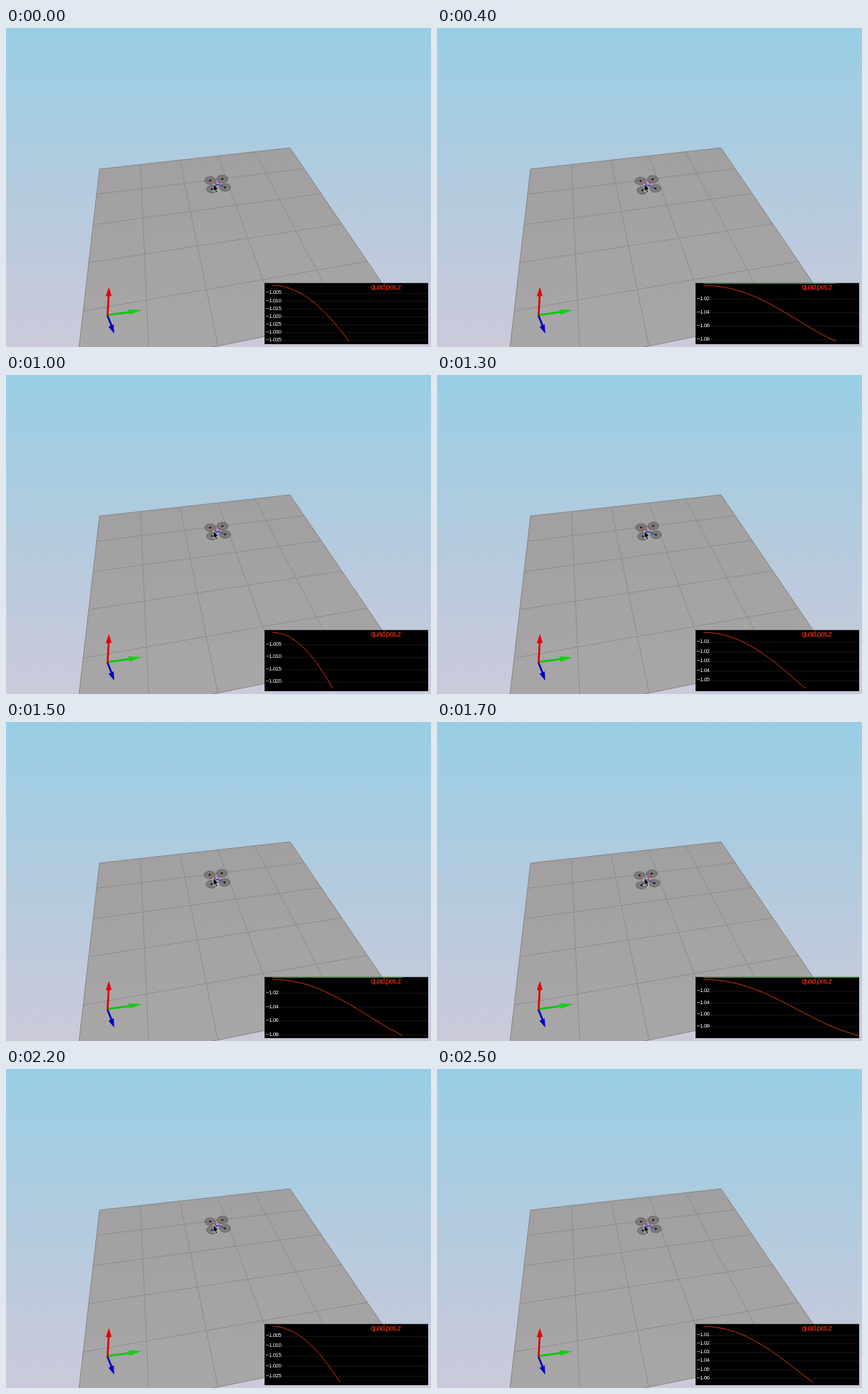
An HTML page that plays this animation: 600 px wide and 450 px high, repeating every 2600 ms.

```html
<!DOCTYPE html>
<html lang="en">
<head>
<meta charset="utf-8">
<title>Quadcopter height plot</title>
<style>
  html, body { margin: 0; width: 100%; height: 100%; overflow: hidden; background: #cbcbdb; }
  svg { display: block; width: 600px; height: 450px; }
  text { font-family: "Liberation Sans", Arial, sans-serif; }
  .title { font-size: 10px; letter-spacing: -.7px; fill: #ff3510; }
  .tick { font-size: 8px; letter-spacing: -.5px; fill: #f0f0f0; }
</style>
</head>
<body>
<svg viewBox="0 0 600 450">
  <defs>
    <linearGradient id="sky" x1="0" y1="0" x2="0" y2="1">
      <stop offset="0" stop-color="#98cee5"/>
      <stop offset=".5" stop-color="#b3cbde"/>
      <stop offset="1" stop-color="#cbcada"/>
    </linearGradient>
    <linearGradient id="ground" x1="0" y1="0" x2="0" y2="1">
      <stop offset="0" stop-color="#a19f9f"/>
      <stop offset="1" stop-color="#a9a7a8"/>
    </linearGradient>
    <clipPath id="panel"><rect x="365" y="359.5" width="231" height="86.5"/></clipPath>
  </defs>
  <rect width="600" height="450" fill="url(#sky)"/>
  <path id="floor" fill="url(#ground)" stroke="#858384"/>
  <path id="grid" fill="none" stroke="#8d8b8c"/>

  <g stroke-width="2.6">
    <path d="M143 405L149 420" stroke="#0000b8"/>
    <path d="M144.8 421.5L152 418L152.8 431Z" fill="#0000c8"/>
    <path d="M143 405L175 400.6" stroke="#00c800"/>
    <path d="M172.8 397L191.5 398L174.4 404.5Z" fill="#10d010"/>
    <path d="M143.4 406L145 377" stroke="#d80000"/>
    <path d="M141 378L145.2 365.5L149 377.5Q145 379.5 141 378Z" fill="#e40000"/>
  </g>

  <g id="drone"></g>
  <path d="M292.6 219.8V230.6L295 228.5L296.9 232.8L298.8 232L296.9 227.8H300.2Z"
        fill="#000" stroke="#fff" stroke-width=".7"/>

  <g clip-path="url(#panel)">
    <rect x="365" y="359.5" width="231" height="86.5" fill="#000"/>
    <g id="ticks"></g>
    <path id="goal" fill="none" stroke="#3fa536" stroke-width="1.3"/>
    <path id="curve" fill="none" stroke="#d8350f"/>
    <text class="title" x="515" y="369">quad.pos.z</text>
  </g>
</svg>
<script>
const LOOP = 2600, STEP = 100;
const LAUNCHES = [-548, 570, 1717];   // start of each flight, ms
const LEFT = 376.3, TOP = 363.2, BOTTOM = 442, SPEED = 19.72;
const $ = id => document.getElementById(id);
const put = (id, d) => $(id).setAttribute("d", d);

// Ground plane: unit square in perspective
function ground(u, v) {
  const w = 1 + .0951 * u - .4442 * v;
  return ((132 + 307.1 * u - 77.2 * v) / w).toFixed(2) + " " +
         ((199 - 13.9 * u + 73 * v) / w).toFixed(2);
}
const segment = (a, b, c, d) => `M${ground(a, b)}L${ground(c, d)}`;

put("floor", `M${ground(0, 0)}L${ground(1, 0)}L${ground(1, 1)}L${ground(0, 1)}Z`);
let lines = "";
for (let i = 1; i < 5; i++) lines += segment(i / 5, 0, i / 5, 1) + segment(0, i / 5, 1, i / 5);
put("grid", lines);

// Distance travelled along z after p tenths of a second
const drop = p => .001245 * p * p / (1 + Math.pow(p / 12.7, 3.5));

function tickStep(scale) {
  for (let e = -5; e < 0; e++)
    for (const m of [1, 2, 5]) {
      const step = m * Math.pow(10, e);
      if (step * scale > 10.5) return [step, -e];
    }
  return [.1, 1];
}

function drawPlot(p) {
  const depth = drop(p), range = Math.max(depth, .001);
  const scale = (BOTTOM - TOP) / range;
  const yOf = z => (TOP + BOTTOM) / 2 + (z - depth / 2) * scale;
  const [step, digits] = tickStep(scale);

  let ticks = "";
  for (let k = 0; yOf(k * step) < 444; k++) {
    const y = yOf(k * step);
    if (y < 368) continue;
    ticks += `<path d="M366 ${y.toFixed(2)}H596" stroke="#191919"/>` +
      `<text class="tick" x="366.8" y="${(y + 1.2).toFixed(2)}">\u2212${(1 + k * step).toFixed(digits)}</text>`;
  }
  $("ticks").innerHTML = ticks;

  const points = [];
  for (let i = 0; i <= 60; i++) {
    const q = p * i / 60;
    points.push((LEFT + q * SPEED).toFixed(2) + " " + yOf(drop(q)).toFixed(2));
  }
  put("curve", "M" + points.join("L"));
  put("goal", .003 * scale < 3.3 ? `M${LEFT} 360.2H${(LEFT + p * SPEED).toFixed(2)}` : "");
}

function drawDrone(p) {
  const lift = 1.7 * Math.sin(Math.PI * p / 11);
  const tilt = Math.pow(p / 9.4, 2);
  const dx = -Math.pow(p / 9.6, 6);
  const at = (x, y, t) => [x + dx, y - lift + tilt * t];
  const rotors = [at(288.3, 217, -.5), at(305.5, 214.8, -.6), at(291, 228.5, 1.2), at(309.3, 226.4, .6)];
  const [cx, cy] = at(298.3, 222, .2);
  const arms = ["#d8502e", "#d8402e", "#333a70", "#4146a0"];

  const discs = rotors.map(([x, y]) =>
    `<ellipse cx="${x}" cy="${y}" rx="7.8" ry="5.4" fill="#555" fill-opacity=".5" stroke="#555" stroke-width=".7"/>`);
  const beams = rotors.map(([x, y], i) =>
    `<path d="M${cx} ${cy}L${x} ${y}" stroke="${arms[i]}" stroke-width="1.2"/>` +
    `<circle cx="${x}" cy="${y}" r="1.4" fill="#151520"/>`);
  $("drone").innerHTML = discs.join("") + beams.join("") +
    `<ellipse cx="${cx}" cy="${cy - .6}" rx="3.3" ry="2.4" fill="#4c55b8"/>` +
    `<ellipse cx="${cx + .4}" cy="${cy - 1.5}" rx="2" ry=".9" fill="#c9cbe6"/>`;
}

let shown = -1;
function render(now) {
  const t = Math.floor((now % LOOP) / STEP) * STEP;
  if (t !== shown) {
    shown = t;
    const start = LAUNCHES.filter(s => s <= t).pop();
    const p = Math.min((t - start) / 100, 11.1);
    drawPlot(p);
    drawDrone(p);
  }
}

const begin = performance.now();
function tick() {
  render(performance.now() - begin);
  requestAnimationFrame(tick);
}
tick();
</script>
</body>
</html>
```
